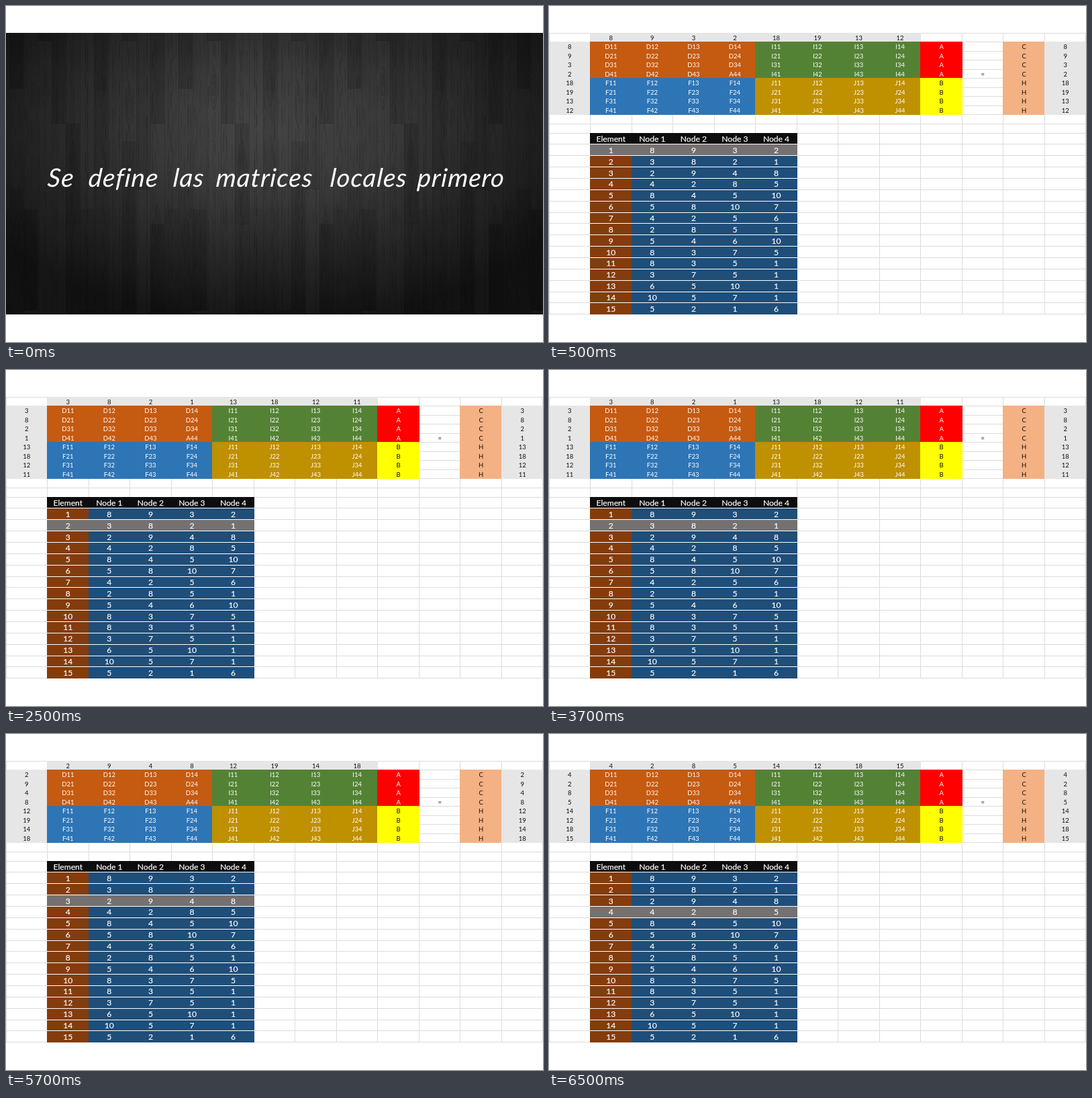
Write an HTML page that moves like this. It is 800 px wide and 500 px high and loops after 8 s.

```html
<!DOCTYPE html>
<html lang="es">
<head>
<meta charset="utf-8">
<title>Matrices locales</title>
<style>
  html, body { margin: 0; width: 100%; height: 100%; overflow: hidden; background: #fff; }
  svg { display: block; width: 100%; height: 100%; }
  text { font-family: Lato, "Open Sans", sans-serif; }
  .small { font-size: 9.5px; text-anchor: middle; }
  .table { font-size: 12.1px; text-anchor: middle; fill: #fff; stroke: #fff; stroke-width: .2; }
  .title { font-size: 38px; font-style: italic; letter-spacing: 1.2px; fill: #fff;
           font-variant-ligatures: none; }
</style>
</head>
<body>
<svg id="stage" viewBox="0 0 800 500">
  <defs>
    <radialGradient id="light" gradientUnits="userSpaceOnUse" cx="0" cy="0" r="1"
      gradientTransform="translate(395 185) scale(490 285)">
      <stop offset="0" stop-color="#434343"/>
      <stop offset=".35" stop-color="#373737"/>
      <stop offset=".7" stop-color="#222"/>
      <stop offset="1" stop-color="#111"/>
    </radialGradient>
    <pattern id="wood" patternUnits="userSpaceOnUse" x="5" y="40" width="252" height="420"></pattern>
  </defs>
  <g id="intro"></g>
  <g id="sheet"></g>
</svg>
<script>
const NS = "http://www.w3.org/2000/svg";
const LOOP = 8000, INTRO = 500, STEP = 2000;
const COL = 800 / 13, TOP = 40, ROW = 13.545, TABLE_TOP = 189, TABLE_ROW = 16.86;
const elements = ("8 9 3 2|3 8 2 1|2 9 4 8|4 2 8 5|8 4 5 10|5 8 10 7|4 2 5 6|2 8 5 1|" +
  "5 4 6 10|8 3 7 5|8 3 5 1|3 7 5 1|6 5 10 1|10 5 7 1|5 2 1 6")
  .split("|").map(row => row.split(" ").map(Number));

const byId = id => document.getElementById(id);
const intro = byId("intro"), sheet = byId("sheet");
const colX = c => Math.min(Math.floor(c * COL), 799);
const rowY = r => Math.floor(TOP + r * ROW);
const tableY = r => Math.floor(TABLE_TOP + r * TABLE_ROW);

function add(parent, tag, attrs, content) {
  const node = document.createElementNS(NS, tag);
  for (const key in attrs) node.setAttribute(key, attrs[key]);
  if (content !== undefined) node.textContent = content;
  parent.appendChild(node);
  return node;
}

function box(parent, x, y, x2, y2, fill, opacity = 1) {
  return add(parent, "rect", { x, y, width: x2 - x, height: y2 - y, fill, "fill-opacity": opacity });
}

function random(seed) {
  return () => (seed = (seed * 16807) % 2147483647) / 2147483647;
}

function buildWood() {
  const wood = byId("wood"), rnd = random(4217), width = 21;
  const joints = [83, 263, 12, 135, 135, 263, 83, 263, 12, 83, 135, 263];
  joints.forEach((joint, i) => {
    const x = i * width;
    [[0, joint], [joint, joint + 150], [joint + 150, 420]].forEach(([y, end]) => {
      const shade = rnd() - .5;
      box(wood, x, y, x + width, end, shade > 0 ? "#fff" : "#000", Math.abs(shade) * (shade > 0 ? .05 : .22));
      box(wood, x, end - 1, x + width, end, "#000", .08);
    });
    box(wood, x, 0, x + 1, 420, "#000", .15);

    let grain = "";
    for (let k = 0; k < 6; k++) {
      const gx = x + 2 + rnd() * 17, sway = rnd() * 3 - 1.5;
      for (let y = rnd() * 30; y < 400; y += 35 + rnd() * 30)
        grain += `M${gx.toFixed(1)} ${y.toFixed(1)}q${sway.toFixed(1)} 12 0 ${(18 + rnd() * 22).toFixed(1)}`;
    }
    // Oval rings on every other plank
    if (i % 2 === 0) {
      const cx = x + width / 2, cy = 60 + rnd() * 280;
      for (let k = 1; k < 4; k++)
        grain += `M${cx} ${cy - 11 * k}q${4 * k} ${11 * k} 0 ${22 * k}q${-4 * k} ${-11 * k} 0 ${-22 * k}`;
    }
    add(wood, "path", { d: grain, fill: "none", stroke: "#000", "stroke-width": .8, opacity: .18 });
  });
}

function buildIntro() {
  buildWood();
  box(intro, 0, 40, 800, 459, "url(#light)");
  box(intro, 0, 40, 800, 459, "url(#wood)");
  const title = add(intro, "text", { class: "title", transform: "translate(0 269) skewX(-5)" });
  const starts = [61, 122, 248, 312, 482, 612];
  "Se define las matrices locales primero".split(" ").forEach((word, i) =>
    add(title, "tspan", { x: starts[i] }, word + " "));
}

function label(c, r, content, fill = "#111") {
  return add(sheet, "text", { class: "small", x: (c + .5) * COL, y: TOP + (r + .5) * ROW + 3.9, fill }, content);
}

function tableLabel(c, r, content) {
  add(sheet, "text", { class: "table", x: (c + .5) * COL, y: TABLE_TOP + (r + .5) * TABLE_ROW + 4.5 }, content);
}

// A filled cell range also covers the grid lines around it
function area(c, r, c2, r2, fill) {
  box(sheet, colX(c), rowY(r), colX(c2) + 1, rowY(r2) + 1, fill);
}

function buildGrid() {
  const line = "#dcdcdc";
  for (let c = 0; c <= 13; c++) box(sheet, colX(c), 40, colX(c) + 1, 459, line);
  for (let r = 0; r < 11; r++) box(sheet, 0, rowY(r), 800, rowY(r) + 1, line);
  for (let r = 0; r <= 16; r++) box(sheet, 0, tableY(r), 800, tableY(r) + 1, line);
}

function buildMatrix() {
  area(1, 0, 9, 1, "#e7e6e6");
  area(0, 1, 1, 9, "#e7e6e6");
  const blocks = [["D", 1, 1, "#c55a11"], ["I", 5, 1, "#548235"], ["F", 1, 5, "#2e75b6"], ["J", 5, 5, "#bf9000"]];
  for (const [, c, r, fill] of blocks) area(c, r, c + 4, r + 4, fill);
  area(9, 1, 10, 5, "#f00");
  area(9, 5, 10, 9, "#ff0");
  area(11, 1, 12, 9, "#f4b183");
  area(12, 1, 13, 9, "#e7e6e6");

  for (const [letter, c, r] of blocks) {
    for (let i = 0; i < 16; i++) {
      const m = i >> 2, n = i & 3;
      const name = letter === "D" && i === 15 ? "A" : letter;
      label(c + n, r + m, `${name}${m + 1}${n + 1}`, "#fff");
    }
  }
  for (let i = 0; i < 8; i++) {
    label(9, i + 1, i < 4 ? "A" : "B", i < 4 ? "#fff" : "#111");
    label(11, i + 1, i < 4 ? "C" : "H");
  }
  label(10, 4, "=");
}

let highlight;
function buildTable() {
  const left = colX(1), mid = colX(2), right = colX(6) + 1;
  box(sheet, left, TABLE_TOP, right, tableY(1), "#0d0d0d");
  box(sheet, left, tableY(1), mid, 459, "#843c0c");
  box(sheet, mid, tableY(1), right, 459, "#1f4e79");
  highlight = box(sheet, left, 0, right, TABLE_ROW, "#757171");
  for (let r = 1; r < 16; r++) box(sheet, left, tableY(r), right, tableY(r) + 1, "#fff");
  ["Element", "Node 1", "Node 2", "Node 3", "Node 4"].forEach((name, i) => tableLabel(i + 1, 0, name));
  elements.forEach((nodes, i) =>
    [i + 1, ...nodes].forEach((value, c) => tableLabel(c + 1, i + 1, value)));
}

buildIntro();
buildGrid();
buildMatrix();
buildTable();
const indexLabels = Array.from({ length: 8 }, (_, i) =>
  [label(i + 1, 0, ""), label(0, i + 1, ""), label(12, i + 1, "")]);

function draw(t) {
  const showIntro = t < INTRO;
  intro.setAttribute("display", showIntro ? "inline" : "none");
  sheet.setAttribute("display", showIntro ? "none" : "inline");
  if (showIntro) return;
  const current = Math.floor((t - INTRO) / STEP);
  const nodes = elements[current];
  highlight.setAttribute("y", tableY(current + 1));
  highlight.setAttribute("height", tableY(current + 2) - tableY(current + 1));
  [...nodes, ...nodes.map(n => n + 10)].forEach((value, i) =>
    indexLabels[i].forEach(node => { node.textContent = value; }));
}

const start = performance.now();
function tick() {
  draw((performance.now() - start) % LOOP);
  requestAnimationFrame(tick);
}
tick();
</script>
</body>
</html>
```
